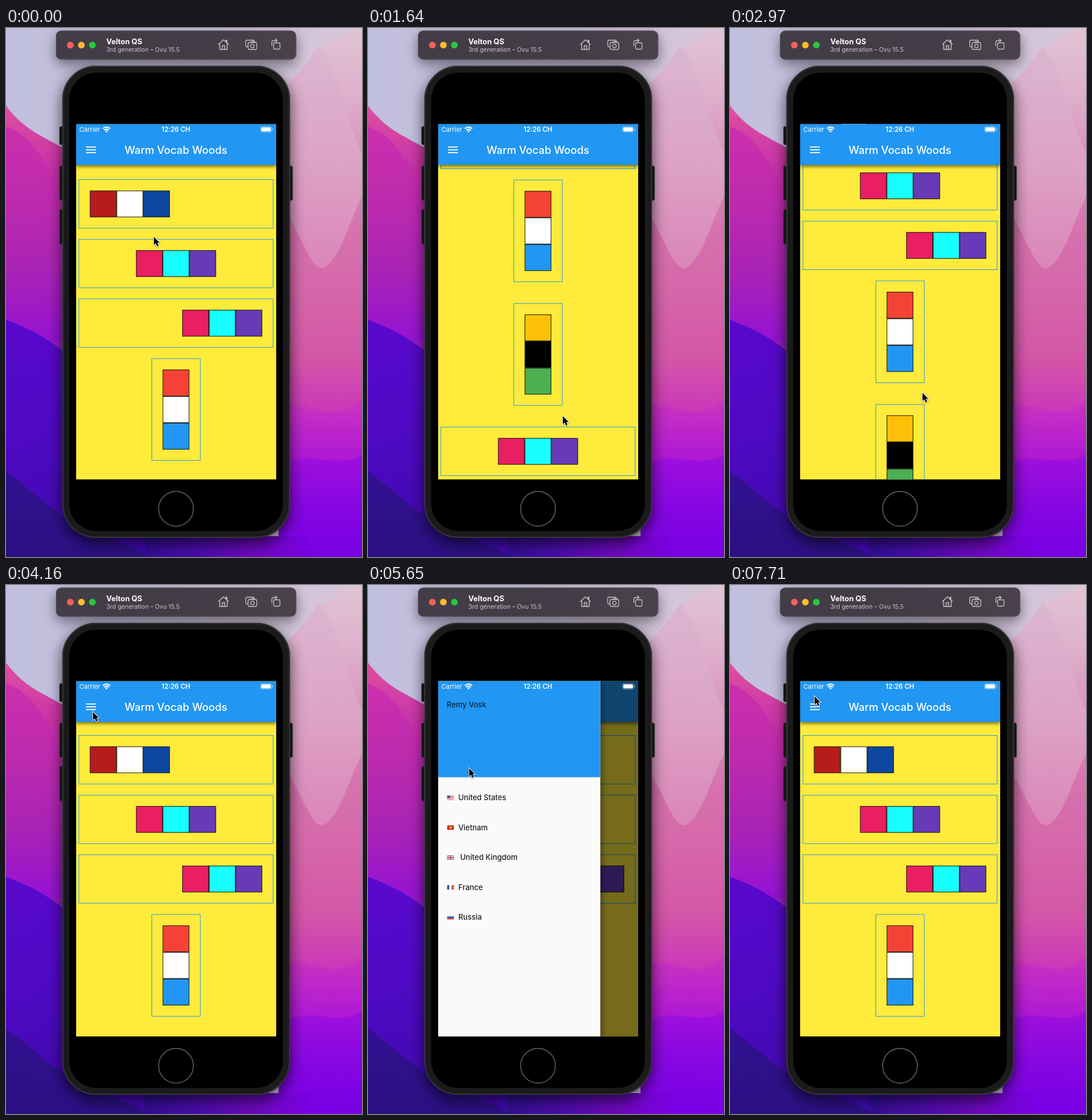
Recreate the animation shown at these times as an HTML page with a canvas. Size 614 by 912 pixels, loop 8 s.

```html
<!DOCTYPE html>
<html lang="en">
<head>
<meta charset="utf-8">
<title>Simulator</title>
<style>
html, body { margin: 0; width: 100%; height: 100%; overflow: hidden; background: #000; }
canvas { display: block; }
</style>
</head>
<body>
<canvas id="stage" width="614" height="912"></canvas>
<script>
const ctx = document.getElementById('stage').getContext('2d');
const LOOP = 8000, STEP = 148.2, LAST_STEP = 52;
const SCREEN = { x: 121, y: 165.5, w: 345, h: 613 };
const BLUE = '#2196f3', DRAWER_WIDTH = 279.7;

// Keyframes: [step, value, ...]; values between are linear.
const SCROLL = [[0, 0], [3, 0], [6, 225], [8, 295], [10, 308], [15, 308], [20, 134], [22, 20], [23, -2], [26, 2]];
const DRAWER = [[29, 0], [30, .45], [31, .948], [32, 1], [47, 1], [48, .45], [49, 0]];
const CURSOR = [[0, 255, 360], [3, 332, 660], [6, 340, 440], [9, 336, 640], [11, 336, 669], [13, 334, 520],
  [15, 333, 455], [20, 332, 629], [22, 315, 600], [26, 170, 270], [28, 150, 219], [36, 150, 219],
  [37, 154, 252], [39, 195, 380], [41, 215, 488], [43, 302, 430], [45, 232, 378], [46, 221, 372],
  [48, 218, 368], [51, 150, 205], [52, 146, 192]];

const ROW = ['#e91e63', '#18ffff', '#673ab7'];
const BOXES = [
  { y: 261.5, align: 0, colors: ['#b71c1c', '#fff', '#0d47a1'] },
  { y: 364.3, align: .5, colors: ROW },
  { y: 467, align: 1, colors: ROW },
  { y: 570, vertical: true, colors: ['#f44336', '#fff', BLUE] },
  { y: 783, vertical: true, colors: ['#ffc107', '#000', '#4caf50'] },
  { y: 996, align: .5, colors: ROW }
];

function sample(keys, step) {
  const next = keys.findIndex(k => k[0] > step);
  if (next === 0) return keys[0].slice(1);
  if (next < 0) return keys[keys.length - 1].slice(1);
  const a = keys[next - 1], b = keys[next], p = (step - a[0]) / (b[0] - a[0]);
  return a.slice(1).map((v, i) => v + (b[i + 1] - v) * p);
}

function gradient(x0, y0, x1, y1, ...colors) {
  const g = ctx.createLinearGradient(x0, y0, x1, y1);
  colors.forEach((c, i) => g.addColorStop(i / (colors.length - 1), c));
  return g;
}

function rect(x, y, w, h, fill) {
  ctx.fillStyle = fill;
  ctx.fillRect(x, y, w, h);
}

function rounded(x, y, w, h, r, fill, stroke, lineWidth = 1) {
  ctx.beginPath();
  ctx.roundRect(x, y, w, h, r);
  if (fill) { ctx.fillStyle = fill; ctx.fill(); }
  if (stroke) { ctx.strokeStyle = stroke; ctx.lineWidth = lineWidth; ctx.stroke(); }
}

function shape(d, fill) {
  ctx.fillStyle = fill;
  ctx.fill(new Path2D(d));
}

function line(d, color, width) {
  ctx.strokeStyle = color;
  ctx.lineWidth = width;
  ctx.stroke(new Path2D(d));
}

function disc(x, y, r, fill) {
  ctx.beginPath();
  ctx.arc(x, y, r, 0, 7);
  ctx.fillStyle = fill;
  ctx.fill();
}

function text(str, x, y, size, weight, color, align = 'left') {
  ctx.font = `${weight} ${size}px Inter, sans-serif`;
  ctx.fillStyle = color;
  ctx.textAlign = align;
  ctx.textBaseline = 'alphabetic';
  ctx.fillText(str, x, y);
}

function withShadow(color, blur, dy, draw) {
  ctx.save();
  Object.assign(ctx, { shadowColor: color, shadowBlur: blur, shadowOffsetY: dy });
  draw();
  ctx.restore();
}

function drawWallpaper() {
  rect(0, 0, 614, 912, gradient(0, 0, 614, 0, '#c0bfdd', '#c8c1dc', '#d9c6d9'));
  // left: magenta, violet and indigo hills
  shape('M0 134 C35 180 65 186 100 208 L300 300 V912 H0Z',
    gradient(0, 140, 0, 560, '#dc4fa0', '#c731a9', '#b927b0', '#a824b6', '#951bc9'));
  shape('M0 170 C45 185 70 230 100 300 V540 H0Z',
    gradient(0, 180, 0, 540, '#cb2fae', '#bd2aae', '#a923b5', '#9512d4'));
  shape('M0 503 C45 520 70 535 100 558 L400 700 V912 H0Z',
    gradient(0, 510, 110, 860, '#5909cd', '#5009c4', '#4109b0'));
  // right: pink folds melting into violet
  shape('M470 110 C520 80 530 20 614 0 V912 H470Z',
    gradient(0, 0, 0, 912, '#e0c4d5', '#dfb0cc', '#d98fbc', '#d673ae', '#d666aa', '#d456a8', '#c92fbe', '#a70fda', '#7900e4'));
  shape('M470 110 C500 85 520 60 540 30 C580 90 590 170 614 215 V290 C590 340 575 400 548 414 C525 420 510 350 470 300Z',
    gradient(0, 40, 0, 414, '#dbb6d0', '#dda3c6', '#da86b8'));
  shape('M470 655 C520 635 565 690 614 640 V912 H470Z',
    gradient(0, 640, 0, 912, '#cb35bf', '#b31bd3', '#9108df', '#7a00e4'));
  shape('M470 760 C520 720 570 765 614 735 V912 H470Z',
    gradient(0, 740, 0, 912, '#9e10dc', '#8606e2', '#7700e4'));
  // bottom
  shape('M0 765 C40 792 65 820 100 842 C150 875 200 885 250 912 H0Z',
    gradient(0, 770, 0, 912, '#321191', '#2b1082'));
  rect(240, 876, 280, 36, gradient(240, 0, 520, 0, '#300f91', '#4b0cab', '#6d08bd', '#7900df'));
}

function drawToolbar() {
  withShadow('#0007', 22, 8, () => rounded(86, 4.5, 414.5, 50, 9, gradient(86, 0, 500, 0, '#433d48', '#423c46', '#4a414b')));
  rounded(86.5, 5, 413.5, 49, 9, null, '#5b5460');
  ['#ff5f57', '#febc2e', '#28c840'].forEach((c, i) => disc(111 + i * 19, 29.5, 5.8, c));
  text('Velton QS', 173, 27.5, 12.8, 700, '#fff');
  text('3rd generation – Ovu 15.5', 173, 41, 10.5, 400, '#c9c5cb');

  const ink = '#c5c1c7';
  line('M366 28.5 L375 20.5 L384 28.5 M368.5 27 V37 H381.5 V27 M379.5 24 V21 H381 V25.5 M373 37 V30.5 H377 V37', ink, 1.4);
  rounded(413.5, 21, 15, 11.5, 2.5, null, ink, 1.3);
  rounded(417.5, 25, 15, 12, 2.5, '#453e48', ink, 1.3);
  line('M422 25 L423.5 23.3 H427 L428.5 25', ink, 1.3);
  ctx.beginPath();
  ctx.arc(425, 31, 3.1, 0, 7);
  ctx.stroke();
  rounded(461.5, 25.5, 11, 11, 1.5, null, ink, 1.3);
  line('M458.5 31 V25 Q458.5 21.5 462 21.5 H467 M464.5 18.5 L467.5 21.5 L464.5 24.5', ink, 1.3);
}

function drawPhone() {
  [[92.5, 170, 31], [92.5, 238, 59], [92.5, 313, 59], [488, 238, 59]]
    .forEach(([x, y, h]) => rounded(x, y, 6, h, 2, '#1d1d1f', '#343436'));
  withShadow('#000a', 26, 9, () => rounded(97, 65, 393, 814, 58, '#1b1b1c'));
  rounded(98, 66, 391, 812, 57, null, '#363638', 2);
  rounded(109, 77, 368.5, 790, 47, '#000');
  ctx.beginPath();
  ctx.arc(293.2, 828.8, 30, 0, 7);
  ctx.strokeStyle = '#5a5a5a';
  ctx.lineWidth = 1.7;
  ctx.stroke();
}

function drawBox({ y, align, vertical, colors }) {
  const size = 46;
  const x = vertical ? 251.5 : 125.7, w = vertical ? 83.6 : 335;
  ctx.strokeStyle = BLUE;
  ctx.lineWidth = .95;
  ctx.strokeRect(x, y, w, vertical ? 175.6 : 83.6);
  const left = vertical ? 270.2 : 144.6 + align * 159.3;
  colors.forEach((color, i) => {
    const sx = left + (vertical ? 0 : i * size), sy = y + 18.8 + (vertical ? i * size : 0);
    rect(sx, sy, size, size, '#111');
    rect(sx + 1, sy + 1, size - 2, size - 2, color);
  });
}

function drawPage(scroll) {
  rect(SCREEN.x, SCREEN.y, SCREEN.w, SCREEN.h, '#ffeb3b');
  ctx.save();
  ctx.translate(0, -scroll);
  BOXES.forEach(drawBox);
  ctx.restore();
  withShadow('#0008', 6, 2.5, () => rect(SCREEN.x, SCREEN.y, SCREEN.w, 70.5, BLUE));
  [205.2, 210, 214.8].forEach(y => rect(138, y - .9, 17, 1.8, '#fff'));
  text('Warm Vocab Woods', 293, 216.5, 18.3, 500, '#fff', 'center');
}

function stripes(colors, vertical) {
  const n = colors.length;
  colors.forEach((c, i) => vertical ? rect(i * 12 / n, 0, 12 / n, 8, c) : rect(0, i * 8 / n, 12, 8 / n, c));
}

const COUNTRIES = [
  ['United States', 0, () => { stripes(['#d33', '#fff', '#d33', '#fff', '#d33', '#fff', '#d33']); rect(0, 0, 5.5, 4.5, '#3b5ba5'); }],
  ['Vietnam', 0, () => { rect(0, 0, 12, 8, '#d52b25'); disc(6, 4, 2, '#ffd83b'); }],
  ['United Kingdom', 3.3, () => {
    rect(0, 0, 12, 8, '#34487f');
    line('M0 0 L12 8 M12 0 L0 8', '#dcd3dc', 1.5);
    line('M6 0 V8 M0 4 H12', '#fff', 2.8);
    line('M6 0 V8 M0 4 H12', '#cf3344', 1.5);
  }],
  ['France', 0, () => stripes(['#2f58a8', '#f4f4f4', '#e0453f'], true)],
  ['Russia', 0, () => stripes(['#f0f0f0', '#2b5fc0', '#da3b35'])]
];

function drawDrawer(open) {
  if (!open) return;
  rect(SCREEN.x, SCREEN.y, SCREEN.w, SCREEN.h, `rgba(0,0,0,${.54 * open})`);
  ctx.save();
  ctx.translate(SCREEN.x - DRAWER_WIDTH * (1 - open), 0);
  withShadow('#0009', 12, 4, () => rect(0, SCREEN.y, DRAWER_WIDTH, SCREEN.h, '#fafafa'));
  rect(0, SCREEN.y, DRAWER_WIDTH, 166, BLUE);
  rect(0, 331.2, DRAWER_WIDTH, .8, '#b9d5e8');
  text('Remy Vosk', 14.8, 211, 12.9, 500, '#0c2b45');
  COUNTRIES.forEach(([name, indent, flag], i) => {
    const y = 366.5 + i * 51.5;
    ctx.save();
    ctx.translate(15.3, y - 3.8);
    ctx.beginPath();
    ctx.rect(0, 0, 12, 8);
    ctx.clip();
    flag();
    ctx.restore();
    text(name, 34.7 + indent, y + 4.7, 12.9, 500, '#212121');
  });
  ctx.restore();
}

function drawStatusBar() {
  text('Carrier', 126.5, 179, 11, 400, '#fff');
  text('12:26 CH', 293, 179.2, 11.3, 600, '#fff', 'center');
  line('M167 173.6 Q173.4 168 179.8 173.6', '#fff', 2);
  line('M169.4 176.2 Q173.4 172.6 177.4 176.2', '#fff', 2);
  shape('M171.2 177.8 Q173.4 175.8 175.6 177.8 L173.4 180.2Z', '#fff');
  rounded(438.8, 170, 19.5, 9.6, 2.8, null, '#ffffff80', .9);
  rounded(440.2, 171.3, 16.7, 7, 1.7, '#fff');
  rounded(459.2, 173.2, 1.3, 3.4, .7, '#ffffff90');
}

function drawCursor(x, y) {
  ctx.save();
  ctx.translate(x, y);
  const arrow = 'M0 0 V14 L3.2 11 L5.5 16.3 L8 15.2 L5.8 10.2 H10Z';
  withShadow('#0006', 3, 1, () => line(arrow, '#fff', 1.8));
  shape(arrow, '#000');
  ctx.restore();
}

function render(now) {
  const step = Math.min(LAST_STEP, Math.floor((now % LOOP) / STEP));
  drawWallpaper();
  drawToolbar();
  drawPhone();
  ctx.save();
  ctx.beginPath();
  ctx.rect(SCREEN.x, SCREEN.y, SCREEN.w, SCREEN.h);
  ctx.clip();
  drawPage(sample(SCROLL, step)[0]);
  drawDrawer(sample(DRAWER, step)[0]);
  drawStatusBar();
  ctx.restore();
  drawCursor(...sample(CURSOR, step));
}

const start = performance.now();
function tick() {
  render(performance.now() - start);
  requestAnimationFrame(tick);
}
tick();
</script>
</body>
</html>
```
